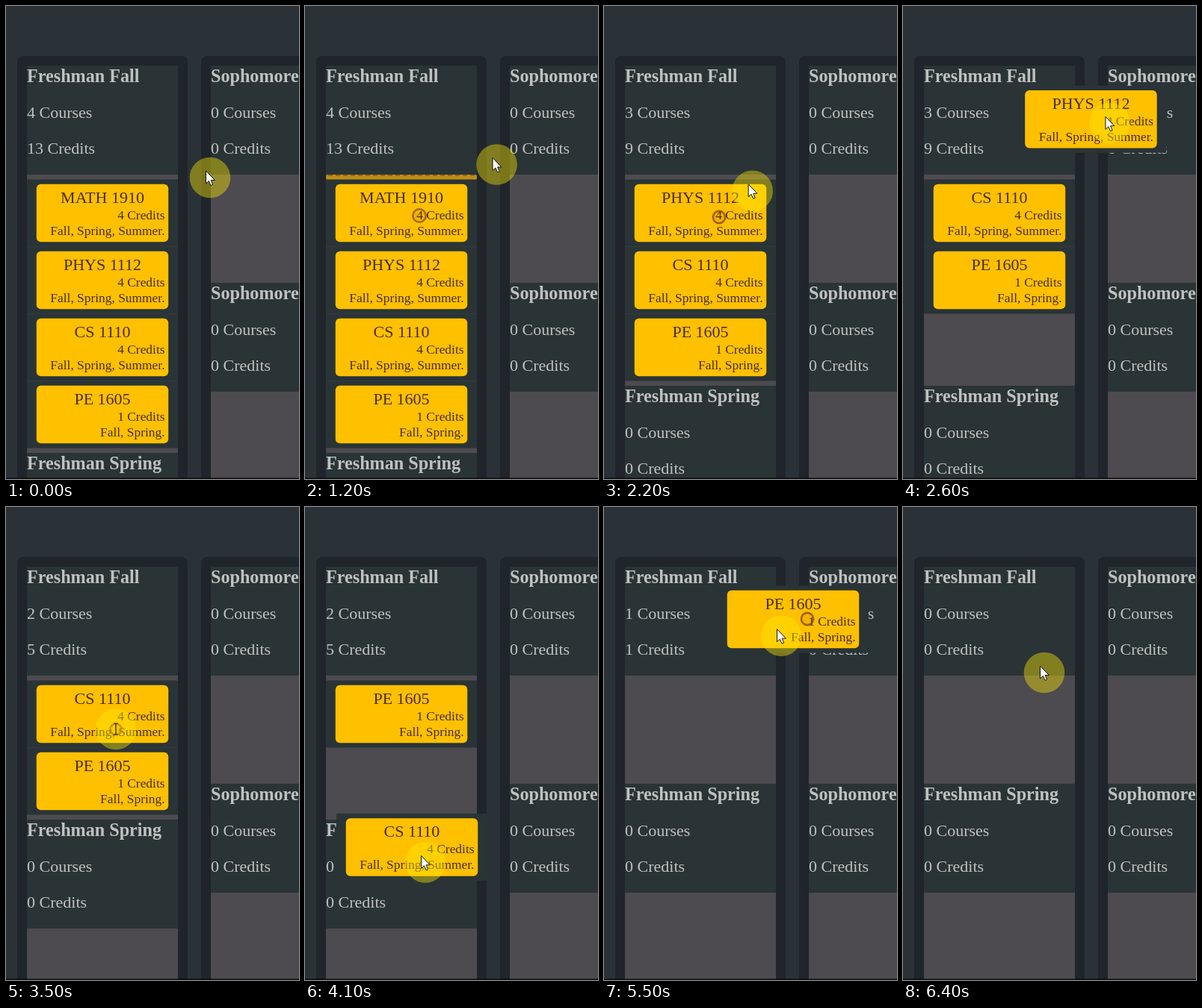
An HTML page for the animation above (6900 ms loop, 392 by 634 pixels).

```html
<!DOCTYPE html>
<html lang="en">
<head>
<meta charset="utf-8">
<title>Course planner</title>
<style>
  html, body { margin: 0; height: 100%; overflow: hidden; background: #2a3238; }
  svg { display: block; width: 100vw; height: 100vh; }
  text { font: 22px "Liberation Serif", "Times New Roman", serif; fill: #c0c1c1; }
  .heading { font-size: 24.15px; font-weight: bold; }
  .column { fill: #1f252a; }
  .panel { fill: #2a3436; }
  .list { fill: #4d4b4f; }
  .card { fill: #ffc000; }
  .item text { fill: #4a2d16; text-anchor: middle; }
  .item .detail { font-size: 17.4px; text-anchor: end; }
  .halo { fill: rgba(255, 234, 0, .41); }
  .ring { fill: rgba(110, 45, 0, .12); stroke: #7a3a08; stroke-width: 2.6; }
</style>
</head>
<body>
<svg id="stage" viewBox="0 0 392 634"></svg>
<script>
const LOOP = 6900, STEP = 100, LAST = 6400;
const LEFT = 28, LIST_TOP = 226, ITEM_TOP = 232.5, ITEM_H = 90, HEADER_H = 146, MIN_LIST = 145;
const TRAVEL = 500, SHIFT = 200, RING_LIFE = 500;
const stage = document.getElementById('stage');

function add(parent, tag, attrs = {}, text = '') {
  const node = document.createElementNS('http://www.w3.org/2000/svg', tag);
  set(node, attrs);
  node.textContent = text;
  parent.appendChild(node);
  return node;
}
function set(node, attrs) {
  for (const key in attrs) node.setAttribute(key, attrs[key]);
}
const move = (node, x, y) => set(node, { transform: `translate(${x} ${y})` });
const show = (node, on) => set(node, { visibility: on ? 'visible' : 'hidden' });
const clamp = v => Math.max(0, Math.min(1, v));

// Each course is dragged out of the list, from its press point to its release point.
const courses = [
  { title: 'MATH 1910', credits: 4, terms: 'Fall, Spring, Summer.', press: 1000, release: 1500, from: [153, 281], to: [298, 163] },
  { title: 'PHYS 1112', credits: 4, terms: 'Fall, Spring, Summer.', press: 2100, release: 2700, from: [154, 283], to: [278, 151] },
  { title: 'CS 1110', credits: 4, terms: 'Fall, Spring, Summer.', press: 3500, release: 4400, from: [147, 298], to: [162, 509] },
  { title: 'PE 1605', credits: 1, terms: 'Fall, Spring.', press: 5000, release: 5400, from: [148, 277], to: [272, 150] }
];
for (const c of courses) {
  c.lift = c.press + 300;
  c.hide = c.release + 300;
  c.drop = c.release + 500;
}
const begin = { release: 400, to: [273, 230] };
const rest = { from: [189, 222] };

// The hand swings sideways a little sooner than it moves up or down.
function glide([x0, y0], [x1, y1], k) {
  const left = 1 - clamp(k);
  return [x1 + (x0 - x1) * left ** 2.45, y1 + (y0 - y1) * left ** 1.7];
}
function pointerAt(t) {
  const i = courses.filter(c => t >= c.press).length;
  const last = courses[i - 1] || begin, next = courses[i] || rest;
  if (t < last.release && last !== begin)
    return glide(last.from, last.to, (t - last.press) / (last.release - last.press));
  return glide(last.to, next.from, (t - last.release) / TRAVEL);
}

function section(x, y, name) {
  const g = add(stage, 'g');
  move(g, x, y);
  add(g, 'rect', { class: 'panel', width: 202, height: HEADER_H });
  add(g, 'text', { class: 'heading', y: 22 }, name);
  const courseText = add(g, 'text', { y: 70 }, '0 Courses');
  const creditText = add(g, 'text', { y: 118 }, '0 Credits');
  const list = add(g, 'rect', { class: 'list', y: HEADER_H, width: 202, height: MIN_LIST });
  return { g, courseText, creditText, list };
}
function column(x, year) {
  add(stage, 'rect', { class: 'column', x, y: 67, width: 228, height: 600, rx: 8 });
  return [section(x + 13, 80, year + ' Fall'), section(x + 13, 371, year + ' Spring')];
}

const [fall, spring] = column(15, 'Freshman');
column(261, 'Sophomore');

const hot = add(stage, 'g');
add(hot, 'rect', { x: LEFT, y: LIST_TOP, width: 202, height: 7, rx: 3, fill: '#bf8e16' });
add(hot, 'path', { d: 'M31 227H227', stroke: '#85591a', 'stroke-width': 1.5, 'stroke-dasharray': '6 4' });

// Built bottom up so the course being dragged lies on top.
[...courses].reverse().forEach(c => {
  const g = c.node = add(stage, 'g', { class: 'item' });
  add(g, 'rect', { class: 'panel', width: 202, height: ITEM_H });
  add(g, 'rect', { class: 'card', x: 12.75, y: 6.25, width: 176.5, height: 77.5, rx: 6 });
  add(g, 'text', { x: 101, y: 31 }, c.title);
  add(g, 'text', { class: 'detail', x: 184.5, y: 53.2 }, c.credits + ' Credits');
  add(g, 'text', { class: 'detail', x: 184.5, y: 74.4 }, c.terms);
});

add(stage, 'rect', { y: 632.5, width: 392, height: 2, fill: '#080a0b' });
const ring = add(stage, 'circle', { class: 'ring' });
const pointer = add(stage, 'g');
add(pointer, 'circle', { class: 'halo', r: 27.3 });
const arrow = add(pointer, 'path', {
  d: 'M-5.5-9V8L-1.6 4.4L1 10.4L3.6 9.3L1.1 3.4H6.3Z',
  fill: '#fff', stroke: '#111', 'stroke-width': 1
});
const beam = add(pointer, 'path', {
  d: 'M-3-8H-1L0-7L1-8H3M0-7V6M-3 7H-1L0 6L1 7H3',
  fill: 'none', stroke: '#2b2418', 'stroke-width': 1.2
});

function drawRing(t) {
  const clicks = courses.flatMap(c => [c.press, c.release]);
  const click = clicks.filter(s => t >= s && t < s + RING_LIFE).pop();
  show(ring, click !== undefined);
  if (click === undefined) return;
  const age = (t - click) / RING_LIFE, [cx, cy] = pointerAt(click);
  set(ring, { cx, cy, r: 7.5 + 3 * age, opacity: .7 * (1 - age ** 3) });
}

function drawCourse(c, i, t) {
  show(c.node, t < c.hide);
  if (t >= c.lift) {
    const [x, y] = pointerAt(Math.min(t, c.release));
    move(c.node, LEFT + x - c.from[0], ITEM_TOP + y - c.from[1]);
  } else {
    const moved = courses.slice(0, i).reduce((sum, d) => sum + clamp((t - d.lift) / SHIFT), 0);
    move(c.node, LEFT, ITEM_TOP + (i - moved) * ITEM_H);
  }
}

function draw(t) {
  const left = courses.filter(c => t < c.drop);
  const credits = left.reduce((sum, c) => sum + c.credits, 0);
  const listH = Math.max(MIN_LIST, left.length * ITEM_H + 13);
  fall.courseText.textContent = left.length + ' Courses';
  fall.creditText.textContent = credits + ' Credits';
  set(fall.list, { height: listH });
  move(spring.g, LEFT, LIST_TOP + listH);

  courses.forEach((c, i) => drawCourse(c, i, t));
  show(hot, courses.some(c => t >= c.lift - STEP && t < c.lift));
  drawRing(t);

  const [x, y] = pointerAt(t);
  const overText = y > 286 && y < 312;
  move(pointer, x, y);
  show(arrow, !overText);
  show(beam, overText);
}

const start = performance.now();
function tick() {
  const t = (performance.now() - start) % LOOP;
  draw(Math.min(LAST, Math.floor(t / STEP) * STEP));
  requestAnimationFrame(tick);
}
tick();
</script>
</body>
</html>
```
